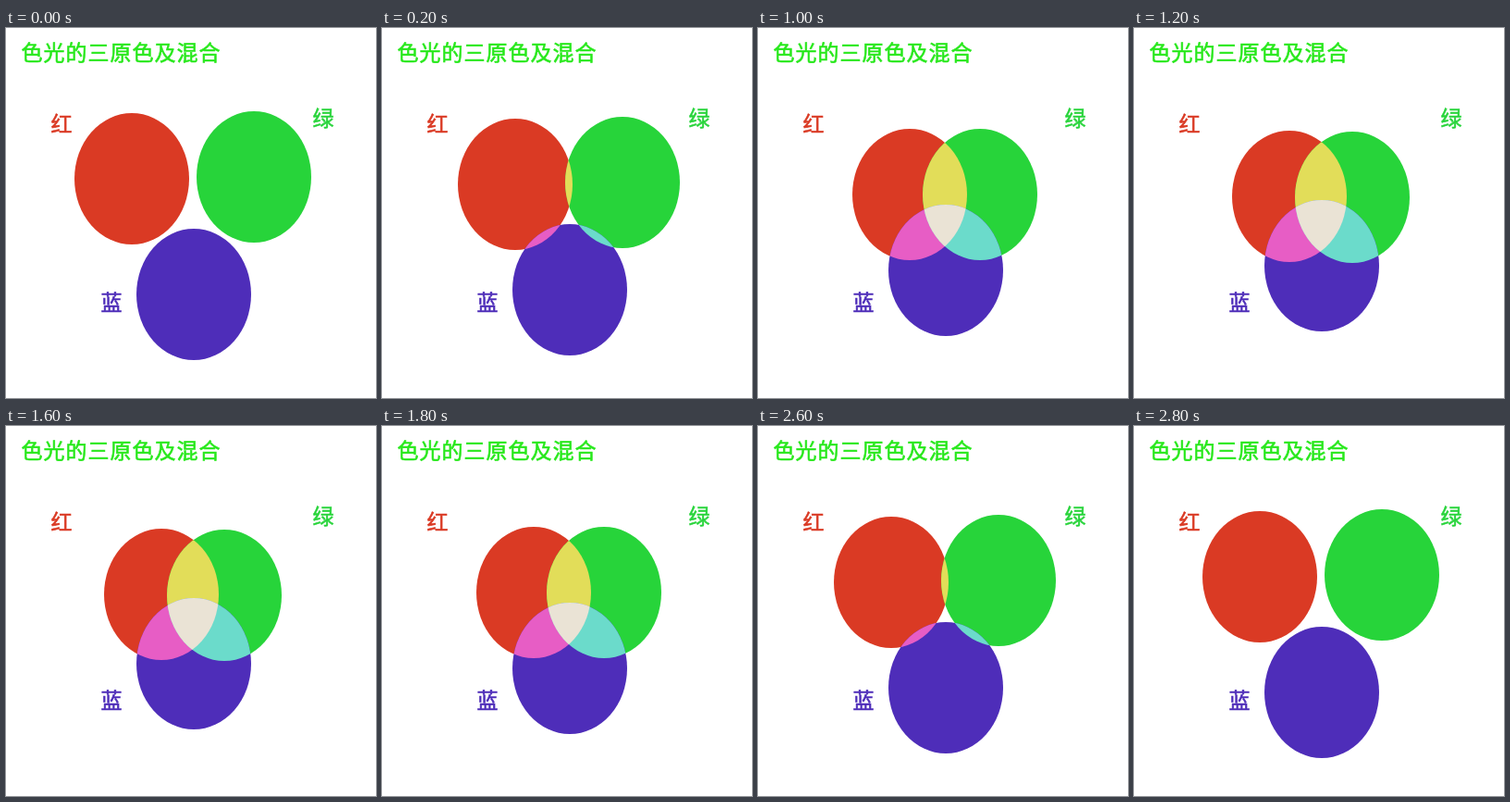
An HTML page for the animation above (3 s loop, 400 by 400 pixels).

```html
<!DOCTYPE html>
<html lang="zh-CN">
<head>
<meta charset="utf-8">
<title>色光的三原色及混合</title>
<style>
  html, body { margin: 0; width: 100%; height: 100%; overflow: hidden; background: #fff; }
  svg { display: block; width: 400px; height: 400px; }
  text {
    font: 500 23px "Noto Sans CJK SC", "Noto Sans CJK", sans-serif;
    letter-spacing: 1px;
    stroke: currentColor;
    stroke-width: 0.6px;
    fill: currentColor;
  }
</style>
</head>
<body>
<svg viewBox="0 0 400 400">
  <defs>
    <ellipse id="red" rx="62" ry="71"/>
    <ellipse id="green" rx="62" ry="71"/>
    <ellipse id="blue" rx="62" ry="71"/>
    <clipPath id="inRed"><use href="#red"/></clipPath>
    <clipPath id="inGreen"><use href="#green"/></clipPath>
  </defs>

  <text x="16.5" y="35" color="#27e81b">色光的三原色及混合</text>
  <text x="48.5" y="111.5" color="#da3a24">红</text>
  <text x="331.5" y="105.5" color="#27d43a">绿</text>
  <text x="102.5" y="304.5" color="#4e2db9">蓝</text>

  <use href="#red" fill="#da3a24"/>
  <use href="#green" fill="#27d43a"/>
  <use href="#blue" fill="#4e2db9"/>
  <g clip-path="url(#inRed)">
    <use href="#green" fill="#e2dd59"/>
    <use href="#blue" fill="#e75dc5"/>
  </g>
  <g clip-path="url(#inGreen)">
    <use href="#blue" fill="#6bdbcb"/>
    <g clip-path="url(#inRed)"><use href="#blue" fill="#eae3d5"/></g>
  </g>
</svg>
<script>
  const STEP = 200, COUNT = 15, MIDDLE = 202;

  function place(id, x, y) {
    const disc = document.getElementById(id);
    disc.setAttribute("cx", x);
    disc.setAttribute("cy", y);
  }

  function draw(time) {
    const step = Math.floor(time / STEP) % COUNT;
    const near = Math.min(step, COUNT - 1 - step); // in, then back out
    // Whole-pixel travel that slows down as the discs meet
    const travel = (from, first, power) => Math.round(from + first * near ** power);

    const spread = travel(66, -8, 0.774);
    place("red", MIDDLE - spread, travel(163, 6, 0.64));
    place("green", MIDDLE + spread, travel(161, 6, 0.72));
    place("blue", MIDDLE + 1, travel(288, -5.4, 0.97));
  }

  const start = performance.now();
  function tick() {
    draw(performance.now() - start);
    requestAnimationFrame(tick);
  }
  tick();
</script>
</body>
</html>
```
